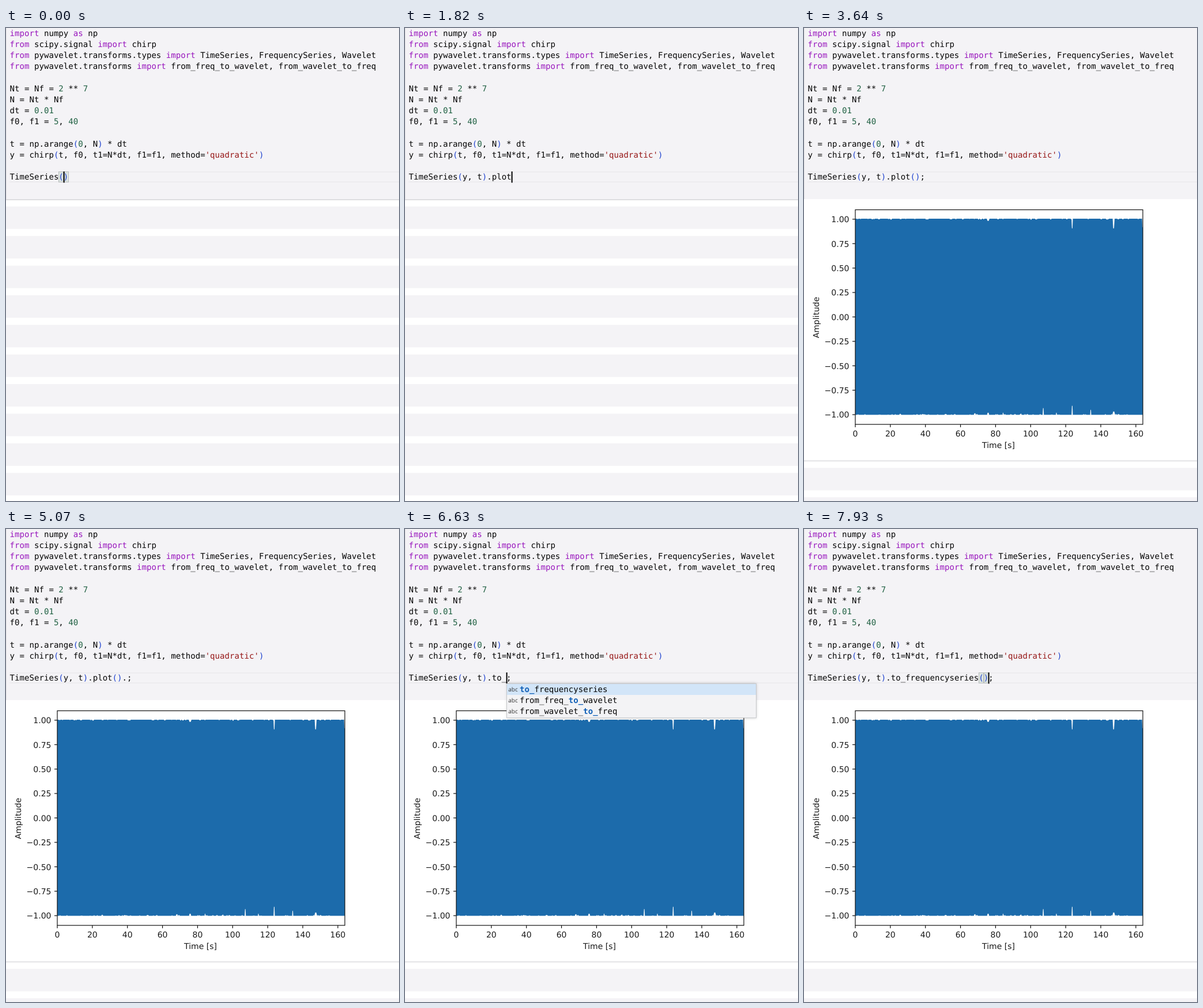
Animation of 682 by 821 pixels, one loop 8 s. Source, as an HTML page with a canvas:

```html
<!DOCTYPE html>
<html lang="en">
<head>
<meta charset="utf-8">
<title>Notebook session</title>
<style>
  html, body { margin: 0; width: 100%; height: 100%; overflow: hidden; background: #fff; }
  canvas { display: block; width: 682px; height: 821px; }
</style>
</head>
<body>
<canvas id="stage" width="682" height="821"></canvas>
<script>
const W = 682, H = 821, LOOP = 8000, STEP = 130;
const ctx = document.getElementById('stage').getContext('2d');

const SIZE = 14.08, CW = SIZE * 0.602, X0 = 6.6, BASE = 14, LINE = 19.15;
const MONO = '"DejaVu Sans Mono", monospace', SANS = '"DejaVu Sans", sans-serif';
const CELL = '#f4f3f6', BLUE = '#1c6bab';
const COLORS = { key: '#9815bd', num: '#1f6042', str: '#961717', par: '#1f43cf', txt: '#050505' };

const CODE = [
  'import numpy as np',
  'from scipy.signal import chirp',
  'from pywavelet.transforms.types import TimeSeries, FrequencySeries, Wavelet',
  'from pywavelet.transforms import from_freq_to_wavelet, from_wavelet_to_freq',
  '',
  'Nt = Nf = 2 ** 7',
  'N = Nt * Nf',
  'dt = 0.01',
  'f0, f1 = 5, 40',
  '',
  't = np.arange(0, N) * dt',
  'y = chirp(t, f0, t1=N*dt, f1=f1, method=\'quadratic\')',
];

// Edits of the last line: [time, text before caret, text after caret, caret shown]
const edits = [];
const add = (t, before, after = '', caret = true) => edits.push([t, 'TimeSeries(' + before, after, caret]);
add(0, '', ')');
add(130, 'y', ')');
add(260, 'y,', ')');
add(520, 'y, ', ')');
add(650, 'y, t', ')');
add(780, 'y, t)');
'.plot'.split('').forEach((c, i) => add(1300 + i * STEP, 'y, t)' + '.plot'.slice(0, i + 1)));
add(1950, 'y, t).plot(', ')');
add(2080, 'y, t).plot()');
add(2470, 'y, t).plot();');
add(3120, 'y, t).plot();', '', false);
add(4290, 'y, t).plot()', ';');
add(4550, 'y, t).plot().', ';');
add(5070, 'y, t).plot().', ';', false);
for (let i = 0; i < 7; i++) add(5200 + i * STEP, 'y, t).plot()'.slice(0, 12 - i), ';');
'to_fre'.split('').forEach((c, i) => add(6370 + i * STEP, 'y, t).' + 'to_fre'.slice(0, i + 1), ';'));
add(7280, 'y, t).to_frequencyseries', ';');
add(7800, 'y, t).to_frequencyseries(', ');');
add(7930, 'y, t).to_frequencyseries()', ';');

const PLOT_AT = 3640, POPUP_FROM = 6500, POPUP_TO = 7280;
const WORDS = ['to_frequencyseries', 'from_freq_to_wavelet', 'from_wavelet_to_freq'];

function rect(x, y, w, h, color) {
  ctx.fillStyle = color;
  ctx.fillRect(x, y, w, h);
}

function text(s, x, y, font, color = '#111', align = 'left') {
  ctx.font = font;
  ctx.fillStyle = color;
  ctx.textAlign = align;
  ctx.fillText(s, x, y);
}

const mono = (s, x, y, color, weight = '') => text(s, x, y, `${weight} ${SIZE}px ${MONO}`, color);

function codeLine(s, row) {
  const tokens = /('[^']*')|\b(import|from|as)\b|\b(\d+(?:\.\d+)?)\b|([()])|[^\s()']+?(?=[\s()']|$)/g;
  for (const m of s.matchAll(tokens)) {
    const kind = m[1] ? 'str' : m[2] ? 'key' : m[3] ? 'num' : m[4] ? 'par' : 'txt';
    mono(m[0], X0 + m.index * CW, BASE + row * LINE, COLORS[kind]);
  }
}

// Columns of the bracket pair that touches the caret
function bracketPair(s, caret) {
  for (const at of [caret - 1, caret]) {
    if (s[at] !== '(' && s[at] !== ')') continue;
    const dir = s[at] === '(' ? 1 : -1;
    for (let i = at, depth = 0; i >= 0 && i < s.length; i += dir) {
      if (s[i] === '(') depth++;
      if (s[i] === ')') depth--;
      if (depth === 0) return [at, i];
    }
  }
  return [];
}

function activeLine([, before, after, caret]) {
  const s = before + after, col = before.length;
  rect(6, 249.4, W, 1, '#e6e5e8');
  rect(6, 266.6, W, 1, '#e6e5e8');
  if (caret) {
    for (const c of bracketPair(s, col)) {
      const x = Math.round(X0 + c * CW);
      rect(x, 249, 9, 19, '#b9bdbd');
      rect(x + 1, 250, 7, 17, '#dde5e1');
    }
  }
  codeLine(s, 13);
  if (caret) rect(Math.round(X0 + col * CW) - 0.4, 249, 2, 19.5, '#000');
}

function emptyCells() {
  rect(0, 297, W, 2, '#dddde0');
  for (let i = 0; i < 10; i++) rect(0, 309.7 + i * 51.4, W, 39, CELL);
}

const AX = 89, AY = 315.5, AW = 499, AH = 372.5;
const px = v => AX + v * 3.043, py = v => 501.5 - v * 169.6;

function notch(x, y, width, depth) {
  ctx.beginPath();
  ctx.moveTo(x - width / 2, y);
  ctx.lineTo(x - width / 5, y + depth);
  ctx.lineTo(x + width / 5, y + depth);
  ctx.lineTo(x + width / 2, y);
  ctx.fill();
}

function signal() {
  const top = py(1) - 0.9, bottom = py(-1) + 0.3;
  rect(AX, top, AW, bottom - top, BLUE);
  ctx.fillStyle = '#fff';
  let seed = 7;
  const rnd = () => (seed = seed * 16807 % 2147483647) / 2147483647;
  for (let i = 0; i < 45; i++) {
    notch(AX + 4 + rnd() * 490, top - 0.3, 2 + rnd() * 3, 0.6 + rnd());
    notch(AX + 4 + rnd() * 490, bottom + 0.3, 2 + rnd() * 3, -0.6 - rnd());
  }
  [[319.5, 5, 4], [465.4, 2.4, 17], [537.3, 3.4, 17], [587.6, 2, 15], [151, 4, 1.8], [394, 3, 2]]
    .forEach(([x, w, d]) => notch(x, top - 0.3, w, d));
  [[167, 4, 2], [296.5, 4, 3], [319.5, 4, 4], [345.5, 2, 4], [376.5, 2, 2.5], [415.2, 2.2, 12],
   [438, 2, 4], [465.4, 2.2, 16], [497.5, 2, 9], [537.5, 5, 6]]
    .forEach(([x, w, d]) => notch(x, bottom + 0.3, w, -d));
}

function plot() {
  const font = `14px ${SANS}`;
  rect(0, 297, W, H - 297, '#fff');
  signal();
  for (let i = -4; i <= 4; i++) {
    const y = py(i / 4);
    rect(AX - 5, y - 0.6, 5, 1.2, '#111');
    text((i < 0 ? '\u2212' : '') + Math.abs(i / 4).toFixed(2), 78.5, y + 5.3, font, '#1a1a1a', 'right');
  }
  for (let v = 0; v <= 160; v += 20) {
    rect(px(v) - 0.6, AY + AH, 1.2, 5, '#111');
    text(v, px(v), 708.6, font, '#1a1a1a', 'center');
  }
  ctx.strokeStyle = '#111';
  ctx.lineWidth = 1.2;
  ctx.strokeRect(AX, AY, AW, AH);
  text('Time [s]', AX + AW / 2 - 1, 728.6, font, '#1a1a1a', 'center');
  ctx.save();
  ctx.translate(26.3, 502.5);
  ctx.rotate(-Math.PI / 2);
  text('Amplitude', 0, 0, font, '#1a1a1a', 'center');
  ctx.restore();
  rect(0, 750.6, W, 1.6, '#dddde0');
  rect(0, 763.5, W, 39, CELL);
  rect(0, 814.5, W, 7, CELL);
}

function popup(before) {
  const typed = before.slice(before.lastIndexOf('.') + 1);
  const words = WORDS.filter(w => w.includes(typed));
  const x = Math.round(X0 + before.length * CW) + 0.5, h = words.length * 19.1 + 2.5;
  ctx.save();
  ctx.shadowColor = 'rgba(0,0,0,.22)';
  ctx.shadowBlur = 5;
  rect(x, 268, 433.5, h, '#f3f3f5');
  ctx.restore();
  rect(x, 268.5, 433.5, 19.5, '#d2e5f8');
  ctx.strokeStyle = '#c6c8cb';
  ctx.lineWidth = 1;
  ctx.strokeRect(x, 268.5, 433, h - 0.5);
  words.forEach((w, i) => {
    const y = 283 + i * 19.1, at = w.indexOf(typed), tx = x + 22.5, end = at + typed.length;
    text('abc', x + 2.8, y - 1.2, `10px "Open Sans", sans-serif`, '#333');
    mono(w.slice(0, at), tx, y, COLORS.txt);
    mono(typed, tx + at * CW, y, '#1261b8', 'bold');
    mono(w.slice(end), tx + end * CW, y, COLORS.txt);
  });
}

function draw(t) {
  const edit = edits.findLast(e => e[0] <= t);
  rect(0, 0, W, H, '#fff');
  rect(0, 0, W, 297, CELL);
  rect(0, 0, 1, 297, '#e4e3e6');
  CODE.forEach(codeLine);
  activeLine(edit);
  if (t < PLOT_AT) emptyCells(); else plot();
  if (t >= POPUP_FROM && t < POPUP_TO) popup(edit[1]);
}

ctx.textRendering = 'geometricPrecision';
const start = performance.now();
function tick() {
  draw((performance.now() - start) % LOOP);
  requestAnimationFrame(tick);
}
tick();
</script>
</body>
</html>
```
